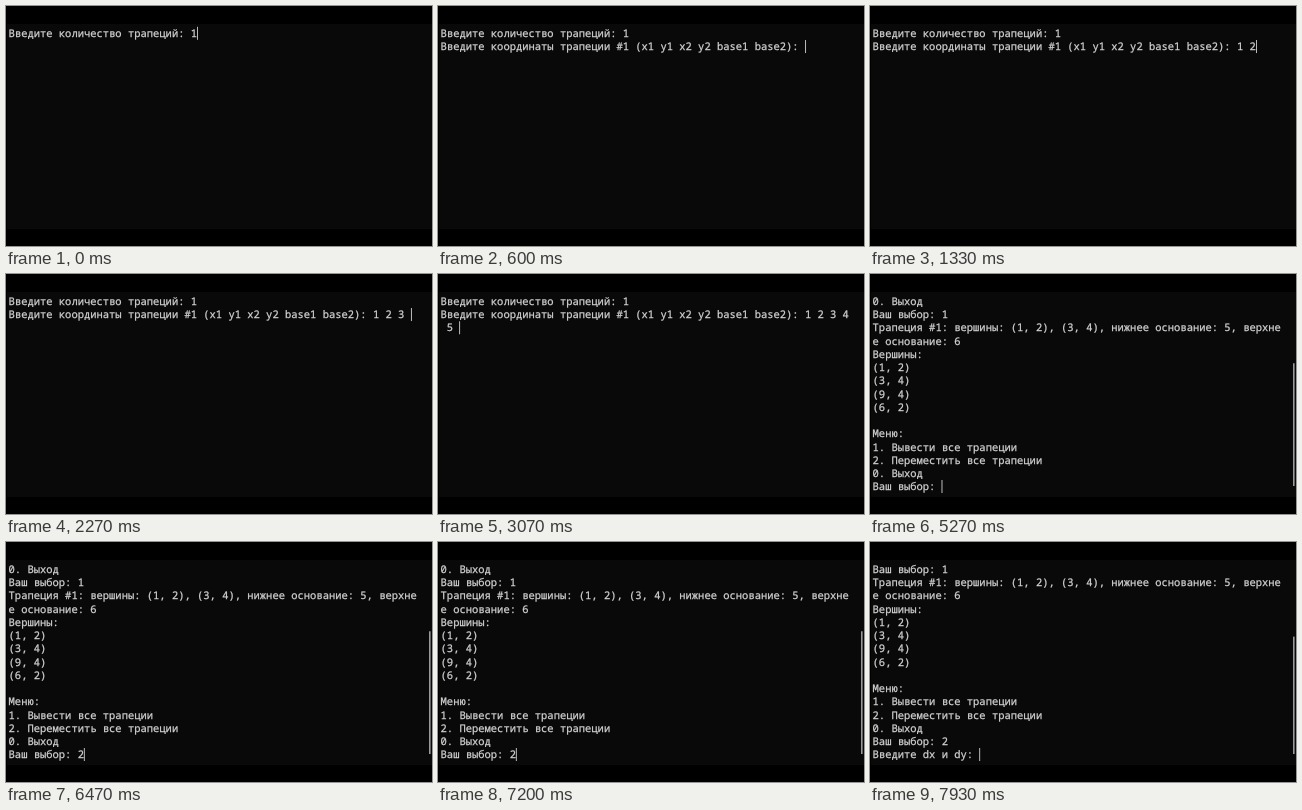
An HTML page for the animation above (8000 ms loop, 426 by 240 pixels).

```html
<!DOCTYPE html>
<html lang="ru">
<head>
<meta charset="utf-8">
<title>Трапеции</title>
<style>
  html, body { margin: 0; width: 100%; height: 100%; overflow: hidden; background: #000; }
  svg { display: block; width: 100%; height: 100%; }
  text {
    font: 500 10.48px "Noto Sans Mono", "DejaVu Sans Mono", monospace;
    fill: #d4d4d4;
    stroke: #d4d4d4;
    stroke-width: 0.25px;
    white-space: pre;
    text-rendering: geometricPrecision;
    font-variant-ligatures: none;
  }
</style>
</head>
<body>
<svg viewBox="0 0 426 240">
  <rect width="426" height="240" fill="#000"/>
  <rect x="1" y="18" width="425" height="205" fill="#090909"/>
  <g id="rows"></g>
  <rect id="bar" x="423" width="1.6" fill="#9a9a9a"/>
  <rect id="cursor" width="0.8" height="13" fill="#e8e8e8"/>
</svg>
<script>
const LOOP = 8000, COLS = 65, ROWS = 15, BLINK = 530;
const LEFT = 2.6, CELL = 6.29, BASE = 31, LINE = 13.23;
const TRACK = { y: 32, h: 180 };

const MENU = "\n\nМеню:\n1. Вывести все трапеции\n2. Переместить все трапеции\n0. Выход\nВаш выбор: ";
const REPORT = "\nТрапеция #1: вершины: (1, 2), (3, 4), нижнее основание: 5, верхнее основание: 6" +
  "\nВершины:\n(1, 2)\n(3, 4)\n(9, 4)\n(6, 2)";

// Terminal output by time: keystrokes and the program's replies
const log = [
  [0, "Введите количество трапеций: 1"],
  [450, "\nВведите координаты трапеции #1 (x1 y1 x2 y2 base1 base2): "],
  [750, "1"], [970, " "], [1200, "2"], [1500, " "], [1800, "3"], [2050, " "],
  [2300, "4"], [2550, " "], [2800, "5"], [3000, " "], [3350, "6"],
  [3750, MENU],
  [4550, "1"],
  [5000, REPORT + MENU],
  [6100, "2"],
  [7500, "\nВведите dx и dy: "]
];

const byId = id => document.getElementById(id);
const bar = byId("bar"), cursor = byId("cursor");
const rows = Array.from({ length: ROWS }, (_, i) => {
  const row = document.createElementNS("http://www.w3.org/2000/svg", "text");
  row.setAttribute("x", LEFT);
  row.setAttribute("y", BASE + i * LINE);
  return byId("rows").appendChild(row);
});

function wrap(text) {
  const lines = [];
  for (let line of text.split("\n")) {
    while (line.length >= COLS) {
      lines.push(line.slice(0, COLS));
      line = line.slice(COLS);
    }
    lines.push(line);
  }
  return lines;
}

function draw(t) {
  const past = log.filter(([at]) => at <= t);
  const lines = wrap(past.map(entry => entry[1]).join(""));
  const total = lines.length, top = Math.max(0, total - ROWS);

  rows.forEach((row, i) => {
    const line = lines[top + i] || "";
    if (row.textContent !== line) row.textContent = line;
  });

  bar.setAttribute("visibility", top ? "visible" : "hidden");
  bar.setAttribute("y", TRACK.y + TRACK.h * top / total);
  bar.setAttribute("height", TRACK.h * ROWS / total);

  const idle = t - past[past.length - 1][0];
  cursor.setAttribute("visibility", Math.floor(idle / BLINK) % 2 ? "hidden" : "visible");
  cursor.setAttribute("x", LEFT + lines[total - 1].length * CELL - 0.2);
  cursor.setAttribute("y", BASE + (total - 1 - top) * LINE - 10.2);
}

const start = performance.now();
function tick() {
  draw((performance.now() - start) % LOOP);
  requestAnimationFrame(tick);
}
tick();
</script>
</body>
</html>
```
